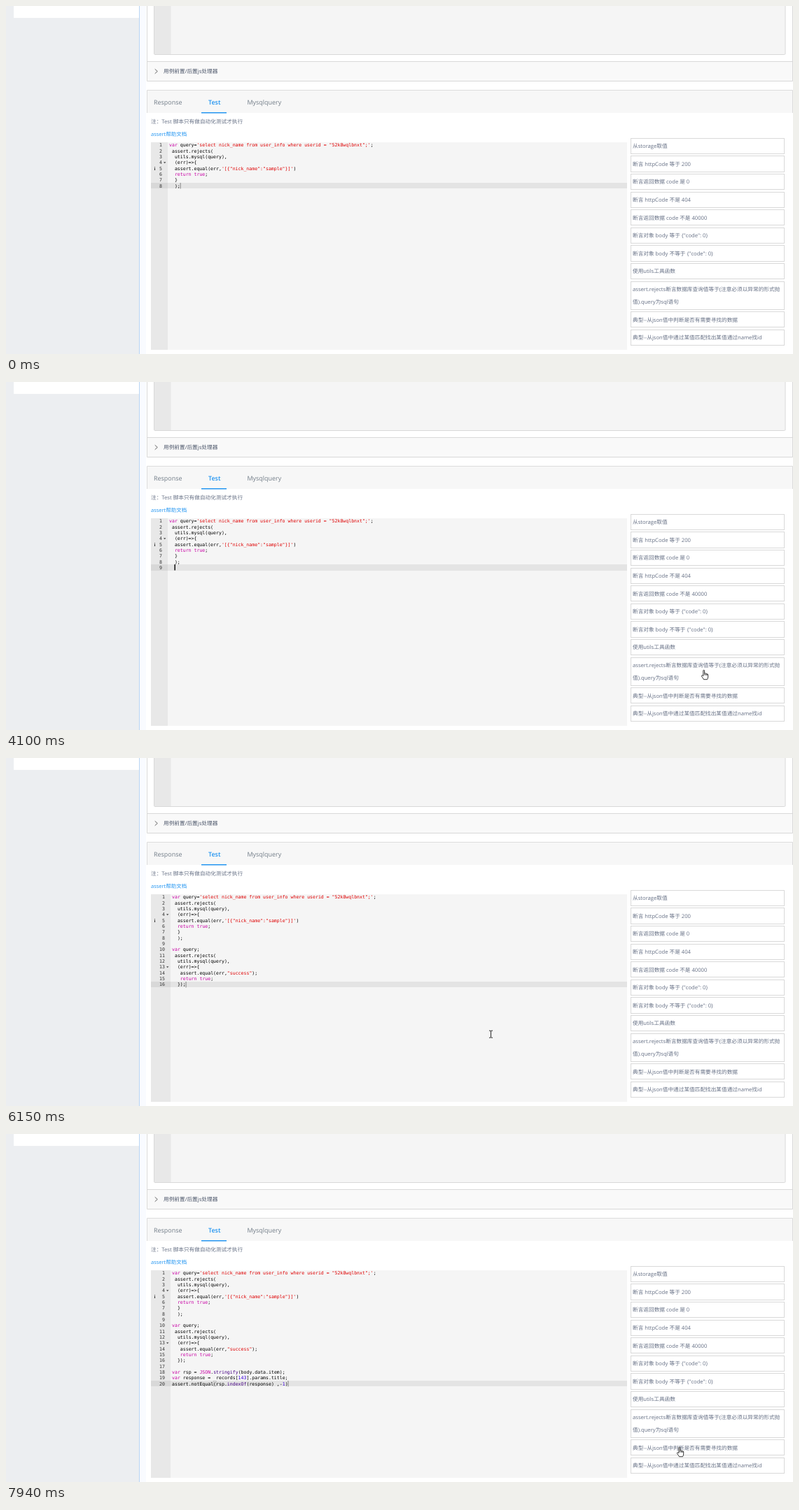
An HTML page that plays this animation: 1124x498 px, repeating every 8000 ms.

```html
<!DOCTYPE html>
<html lang="zh-CN">
<head>
<meta charset="utf-8">
<style>
  html, body { margin: 0; width: 100%; height: 100%; overflow: hidden; background: #fff; }
  svg { display: block; width: 1124px; height: 498px; }
  text { font: 7.67px "Open Sans", "Noto Sans CJK SC", "Noto Sans CJK", sans-serif; fill: #667085; white-space: pre; text-rendering: geometricPrecision; }
  .tab { font-size: 8.95px; fill: #727d88; }
  .blue { fill: #2395f1; }
  .strong { font-weight: 600; }
  .mono text { font: 6.55px "DejaVu Sans Mono", monospace; fill: #000; }
  .mono .num { fill: #333; text-anchor: end; }
  .mono .info { font: bold 7px "Liberation Serif", serif; fill: #333; }
  .key { fill: #c800a4; }
  .str { fill: #df0002; }
  .fn { fill: #450084; }
  .lit { fill: #3a00dc; }
  .box { fill: #fff; stroke: #d9d9d9; }
</style>
</head>
<body>
<svg viewBox="0 0 1124 498">
  <rect width="190" height="498" fill="#eceef1"/>
  <rect x="11" width="179" height="17" fill="#fff"/>
  <rect x="191" width="9" height="498" fill="#f9fbff"/>
  <path d="M190.5 0V498" stroke="#b9d5f4"/>

  <path class="box" d="M201.5 -5H1123.5V107.5H201.5Z"/>
  <rect x="202" y="80" width="921" height="27" fill="#f9f9f9"/>
  <path d="M201 79.5H1123" stroke="#d9d9d9"/>
  <rect x="211.5" y="-5" width="901.5" height="74.5" rx="1.5" fill="#f5f5f5" stroke="#d9d9d9"/>
  <rect x="212" width="23.5" height="69" fill="#e8e8e8"/>
  <path d="M212.7 90.3L216.3 93.5L212.7 96.7" fill="none" stroke="#555" stroke-width=".9"/>
  <text x="225" y="96.3" style="fill:#4c566a">用例前置/后置js处理器</text>

  <path d="M201.5 153V120.5H1123.5V153" fill="#f7f7f7" stroke="#dcdcdc"/>
  <text class="tab" x="211" y="140.7">Response</text>
  <text class="tab blue strong" x="289" y="140.7">Test</text>
  <text class="tab" x="344.5" y="140.7">Mysqlquery</text>
  <rect x="279" y="152" width="36" height="1.5" fill="#2395f1"/>
  <text x="207" y="168.4">注：Test 脚本只有做自动化测试才执行</text>
  <text class="blue" x="207" y="185.8" style="font-size:7.5px">assert帮助文档</text>

  <g id="snippets"></g>
  <g id="editor" class="mono"></g>
  <rect id="caret" height="8.5"/>

  <g id="pointer">
    <path id="beam" d="M-2.5 -5H-.6L0 -4.5L.6 -5H2.5M0 -4.5V4.5M-2.5 5H-.6L0 4.5L.6 5H2.5" fill="none" stroke="#222"/>
    <path id="hand" d="M-2.2 -6.3Q-1.2 -7.2 -.4 -6.2V-2.2Q.8 -3 1.5 -1.7Q2.6 -2.3 3.2 -1.1Q4.6 -1.4 4.7 .2V3Q4.6 5 3.5 6.7H-1.6Q-2.4 4.7 -4.4 2.4Q-5 1 -3.8 .7Q-3 .6 -2.2 1.8ZM1.5 -1.7V.7M3.2 -1.1V1M-.4 -2.2V.5" fill="#fff" stroke="#222" stroke-width=".9" stroke-linejoin="round"/>
  </g>
</svg>
<script>
const LOOP = 8000, CHAR = 3.945, ROW = 8.34, TOP = 195;
const $ = id => document.getElementById(id);
const rowTop = n => TOP + ROW * n;

const code = `var query='select nick_name from user_info where userid = "52k8wqlbnxt";';
 assert.rejects(
  utils.mysql(query),
  (err)=>{
  assert.equal(err,'[{"nick_name":"sample"}]')
  return true;
  }
  );

var query;
 assert.rejects(
  utils.mysql(query),
  (err)=>{
   assert.equal(err,"success");
   return true;
  });

var rsp = JSON.stringify(body.data.item);
var response =  records[143].params.title;
assert.notEqual(rsp.indexOf(response) ,-1)`.split("\n");

// A click or Enter focuses the editor and restarts the blink; inserting a snippet removes focus.
const actions = [
  { at: 0, lines: 8 },
  { at: 1960, lines: 8, focused: true },
  { at: 3090, lines: 9, focused: true },
  { at: 4700, lines: 16 },
  { at: 6750, lines: 16, focused: true },
  { at: 7300, lines: 17, focused: true },
  { at: 7810, lines: 20 }
];

// Each pointer move starts where the previous one ended.
const entry = { x: 1093, y: 491 };
const moves = [
  { from: 320, to: 1120, x: 664, y: 292 },
  { from: 1120, to: 1250, x: 513, y: 305 },
  { from: 1250, to: 1720, x: 460, y: 264 },
  { from: 2380, to: 2970, x: 608, y: 274 },
  { from: 2970, to: 3640, x: 1022, y: 437 },
  { from: 3640, to: 3840, x: 998, y: 419 },
  { from: 4960, to: 5290, x: 984, y: 440 },
  { from: 5290, to: 5760, x: 888, y: 446 },
  { from: 5820, to: 6550, x: 457, y: 334 },
  { from: 7020, to: 7150, x: 600, y: 342 },
  { from: 7150, to: 7610, x: 963, y: 455 }
];

const snippets = [
  "从storage取值", "断言 httpCode 等于 200", "断言返回数据 code 是 0", "断言 httpCode 不是 404",
  "断言返回数据 code 不是 40000", '断言对象 body 等于 {"code": 0}', '断言对象 body 不等于 {"code": 0}',
  "使用utils工具函数", "assert.rejects断言数据库查询值等于(注意必须以异常的形式抛\n值).query为sql语句",
  "典型--从json值中判断是否有需要寻找的数据", "典型--从json值中通过某值匹配找出某值通过name找id"
];
let nextY = 189.3;
$("snippets").innerHTML = snippets.map(item => {
  const lines = item.split("\n"), y = nextY, bottom = y + 4.2 + 18 * lines.length;
  nextY = bottom + 3.4;
  return `<rect class="box" x="892.5" y="${Math.floor(y) + .5}" width="219" height="${Math.floor(bottom) - Math.floor(y)}"/>` +
    lines.map((line, i) => `<text x="895" y="${y + 13.8 + 18 * i}">${line}</text>`).join("");
}).join("");

const paint = line => line.replace(
  /('.*?'|".*?")|\b(var|return|true|JSON)\b|\b(stringify|indexOf)\b|\b(\d+)\b/g,
  (word, str, key, fn) => `<tspan class="${str ? "str" : key ? "key" : fn ? "fn" : "lit"}">${word}</tspan>`);

const codeLeft = lines => 229 + 4 * String(lines).length;

function drawEditor(count) {
  const x = codeLeft(count), top = Math.floor(rowTop(count - 1));
  let svg = `<rect x="207" y="195" width="680" height="297" fill="#f5f5f5"/>
    <rect x="207" y="195" width="${x - 209}" height="297" fill="#e8e8e8"/>
    <rect x="207" y="${top}" width="680" height="${Math.floor(rowTop(count)) - top}" fill-opacity=".071"/>
    <text class="info" x="211.5" y="${rowTop(4) + 6.2}">i</text>`;
  code.slice(0, count).forEach((line, i) => {
    const y = rowTop(i) + 6.2;
    svg += `<text class="num" x="${x - 10}" y="${y}">${i + 1}</text><text x="${x}" y="${y}">${paint(line)}</text>`;
    if (line.endsWith("{")) svg += `<path d="M${x - 8} ${y - 3}h3.4l-1.7 2z" fill="#444"/>`;
  });
  // Outline the bracket that matches the one before the caret
  const last = code[count - 1];
  if (last.startsWith("assert"))
    svg += `<rect x="${x + last.indexOf("(") * CHAR}" y="${top + .6}" width="${CHAR}" height="7.2" fill="none" stroke="#aaa" stroke-width=".6"/>`;
  $("editor").innerHTML = svg;
}

function drawCaret(t, { at, lines, focused }) {
  const autoIndent = 2, column = code[lines - 1].length || autoIndent;
  const caret = $("caret");
  caret.setAttribute("x", codeLeft(lines) + column * CHAR - (focused ? .4 : 0));
  caret.setAttribute("y", Math.floor(rowTop(lines - 1)));
  caret.setAttribute("width", focused ? 1.4 : .6);
  caret.setAttribute("opacity", focused ? +((t - at) % 1000 < 600) : .7);
}

function drawPointer(t) {
  const i = moves.findLastIndex(move => move.from <= t);
  $("pointer").style.display = i < 0 ? "none" : "";
  if (i < 0) return;
  const move = moves[i], start = moves[i - 1] || entry;
  const k = Math.min(1, (t - move.from) / (move.to - move.from));
  const x = start.x + (move.x - start.x) * k, y = start.y + (move.y - start.y) * k;
  $("beam").style.display = x < 887 ? "" : "none";
  $("hand").style.display = x < 887 ? "none" : "";
  $("pointer").setAttribute("transform", `translate(${x} ${y})`);
}

let shownLines;
const start = performance.now();
function frame() {
  const t = (performance.now() - start) % LOOP;
  const action = actions.findLast(a => a.at <= t);
  if (action.lines !== shownLines) drawEditor(shownLines = action.lines);
  drawCaret(t, action);
  drawPointer(t);
  requestAnimationFrame(frame);
}
frame();
</script>
</body>
</html>
```
